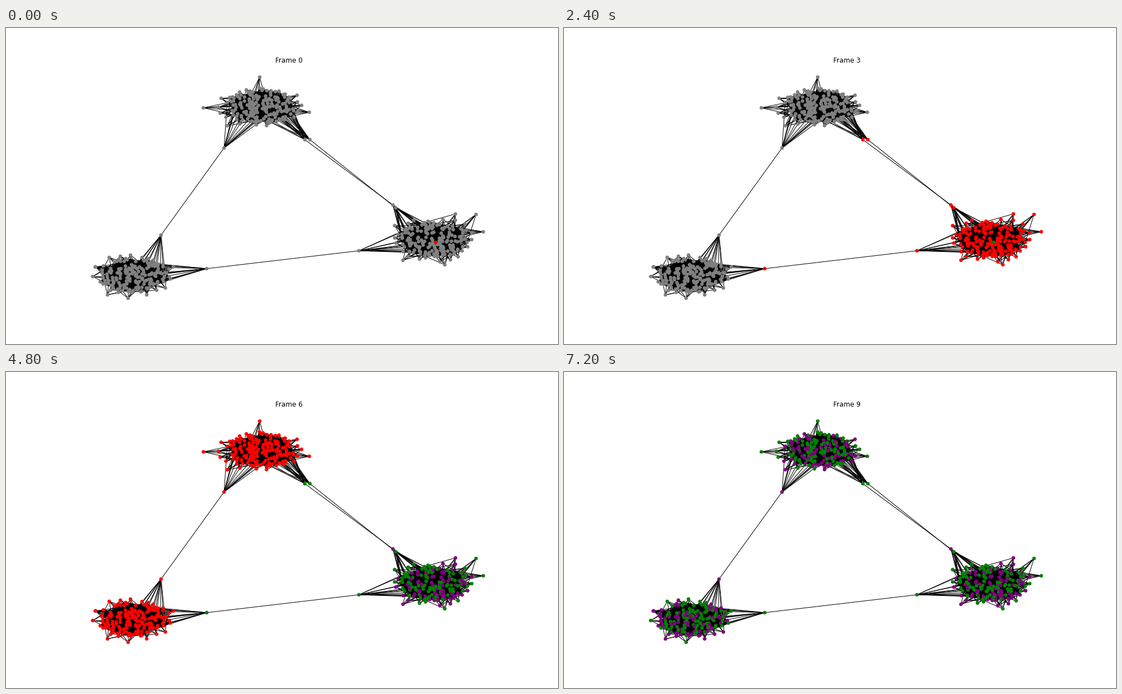
Animation of 990 by 566 pixels, one loop 8000 ms. Source, as a matplotlib script:

```python
import numpy as np
import matplotlib.pyplot as plt
from matplotlib.animation import FuncAnimation
from matplotlib.collections import LineCollection
from matplotlib.colors import to_rgba

W, H, DPI = 990, 566, 72
FRAMES, STEP_MS = 10, 800
SICK_FOR = 3  # steps between infection and outcome
CORE, RIM = 145, 22  # nodes inside and around each cluster
CORE_LINK, RIM_LINKS, FAN = 0.12, 6, 13
SEED_XY = (770.5, 384)

rng = np.random.default_rng(11)


def spread(direction, limit, first):
    """Infection sweeps along a direction over two steps, with some noise."""
    def rule(uv):
        score = uv @ direction + rng.normal(0, 0.35, len(uv))
        return np.where(score > limit, first, first + 1)
    return rule


def outbreak(uv):
    """A few early cases, then half of the cluster, then the rest."""
    r = np.hypot(*uv.T)
    times = np.where(rng.random(len(uv)) < 0.72 - 0.3 * r, 2, 3)
    times[rng.choice(CORE, 8, replace=False)] = 1
    return times


# centre, radii, far-out nodes, infection rule
CLUSTERS = [
    ((457, 140), (62, 30), [(455, 88), (354, 143), (544, 151), (397, 175)],
     spread((1, 1), -0.4, 5)),
    ((229, 442), (60, 31), [(219, 484), (182, 478), (300, 428), (160, 428)],
     spread((1, 0.2), -0.2, 5)),
    ((768, 379), (61, 32), [(787, 424), (856, 365), (843, 334), (806, 333),
                            (697, 354), (712, 416)], outbreak),
]

# x, y, infection step, outcome, cluster
BRIDGES = [
    (391, 215, 5, "purple", 0), (536, 200, 3, "green", 0),
    (545, 200, 3, "green", 0), (278, 371, 5, "purple", 1),
    (360, 431, 3, "green", 1), (694, 317, 2, "purple", 2),
    (699, 322, 2, "green", 2), (633, 399, 2, "green", 2),
]
LINKS = [(0, 3), (1, 5), (2, 6), (4, 7)]


def core_points():
    """Scatter points in a unit disc, kept slightly apart."""
    pts = []
    while len(pts) < CORE:
        r, a = rng.random() ** 0.55, rng.uniform(0, 2 * np.pi)
        p = r * np.array([np.cos(a), np.sin(a)])
        if all(np.hypot(*(p - q)) > 0.06 for q in pts):
            pts.append(p)
    return np.array(pts)


def rim_points():
    a = (np.arange(RIM) + rng.uniform(-0.4, 0.4, RIM)) * 2 * np.pi / RIM
    r = rng.uniform(1.0, 1.25, RIM)
    return np.column_stack([r * np.cos(a), r * np.sin(a)])


def pick_near(p, pts, pool, count):
    """Random choice among the points closest to p."""
    order = np.argsort(np.hypot(*(pts - p).T))[:pool]
    return rng.choice(order, count, replace=False)


def build_cluster(centre, radii, far, rule):
    uv = np.vstack([core_points(), rim_points(),
                    (np.array(far) - centre) / radii])
    pts = uv * radii + centre
    i, j = np.triu_indices(CORE, 1)
    keep = rng.random(len(i)) < CORE_LINK
    lines = [(pts[a], pts[b]) for a, b in zip(i[keep], j[keep])]
    for p in pts[CORE:]:
        lines += [(p, pts[k]) for k in pick_near(p, pts[:CORE], 80, RIM_LINKS)]
    return pts, rule(uv), lines


groups = [build_cluster(*c) for c in CLUSTERS]
edges = [line for g in groups for line in g[2]]

for x, y, step, _, c in BRIDGES:
    pts, times, _ = groups[c]
    near = pick_near((x, y), pts[:CORE], 36, FAN)
    edges += [((x, y), pts[k]) for k in near]
    if step == 3:
        times[near] = 4  # contacts of the first case in a new cluster
edges += [(BRIDGES[a][:2], BRIDGES[b][:2]) for a, b in LINKS]

bridge_xy = [b[:2] for b in BRIDGES]
nodes = np.vstack([g[0] for g in groups] + [bridge_xy, [SEED_XY]])
times = np.concatenate([g[1] for g in groups] + [[b[2] for b in BRIDGES], [0]])
inner = len(nodes) - len(BRIDGES) - 1
fates = list(rng.choice(["green", "purple"], inner, p=[0.57, 0.43]))
fates += [b[3] for b in BRIDGES] + ["green"]
outcome = np.array([to_rgba(f) for f in fates])

fig, ax = plt.subplots(figsize=(W / DPI, H / DPI), dpi=DPI, facecolor="white")
fig.subplots_adjust(left=0.125, right=0.9, bottom=0.11, top=0.88)
# Data units are stage pixels, with y pointing down.
ax.set_xlim(0.125 * W, 0.9 * W)
ax.set_ylim(0.89 * H, 0.12 * H)
ax.axis("off")
ax.add_collection(LineCollection(edges, colors="black", linewidths=1, zorder=1),
                  autolim=False)
dots = ax.scatter(*nodes.T, s=30, linewidths=1, zorder=2)
title = ax.set_title("", fontsize=12, family="DejaVu Sans")


def draw(n):
    colors = outcome.copy()
    colors[n < times + SICK_FOR] = to_rgba("red")
    colors[n < times] = to_rgba("gray")
    dots.set_facecolor(colors)
    dots.set_edgecolor(colors)
    title.set_text(f"Frame {n}")
    return dots, title


anim = FuncAnimation(fig, draw, frames=FRAMES, interval=STEP_MS,
                     repeat=True, repeat_delay=0)
plt.show()
```
